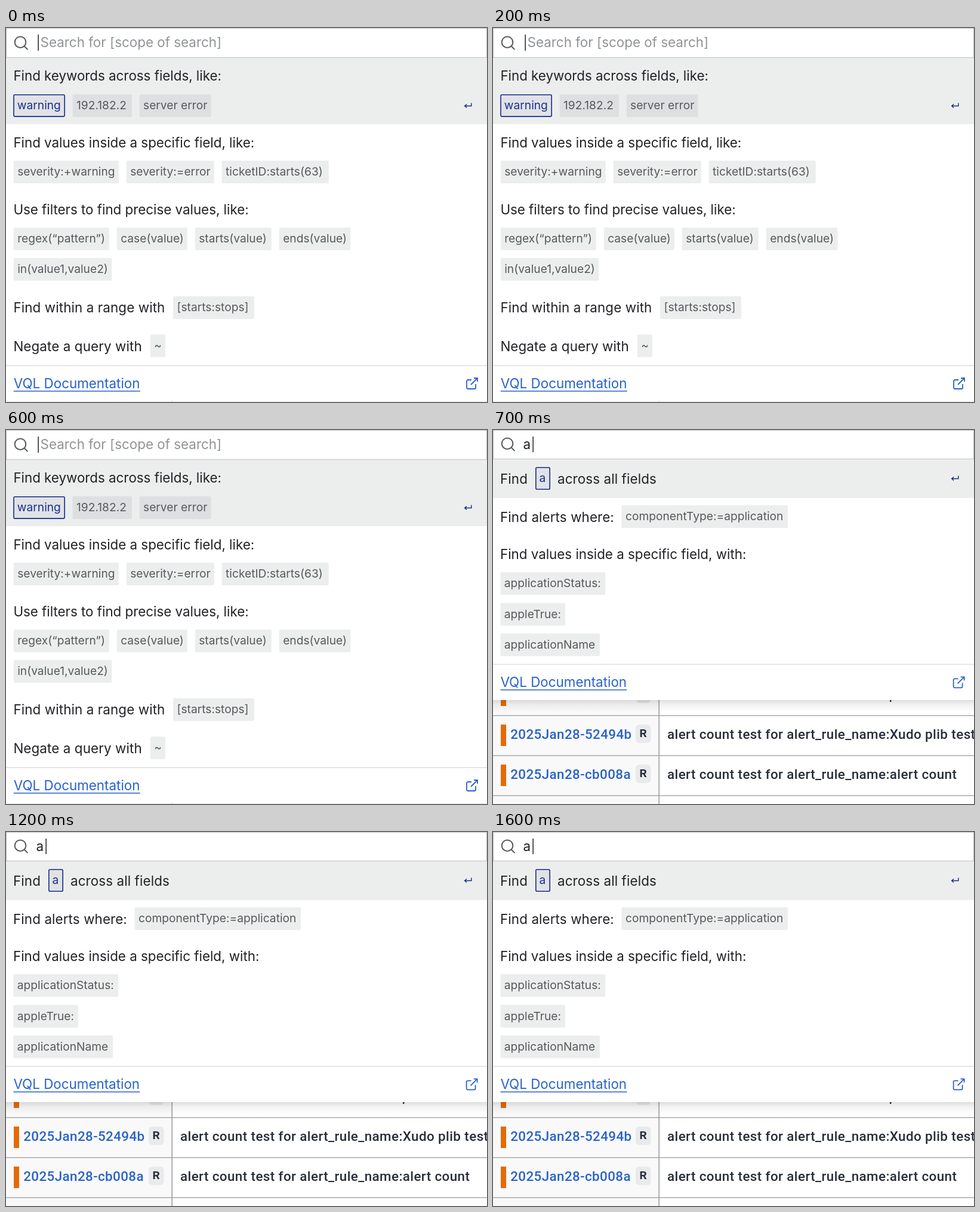
Recreate the animation shown at these times as an HTML page. Size 806x626 px, loop 4200 ms.

```html
<!DOCTYPE html>
<html lang="en">
<head>
<meta charset="utf-8">
<title>Search suggestions</title>
<style>
  html, body { margin: 0; width: 100%; height: 100%; overflow: hidden; background: #fff; }
  svg { display: block; width: 806px; height: 626px; }
  text { white-space: pre; font-optical-sizing: none; }
  .ui { font: 400 22.4px Inter, sans-serif; fill: #202226; }
  .title { letter-spacing: -.03px; }
  .lead { letter-spacing: .1px; }
  .chip { font: 400 19.2px Inter, sans-serif; fill: #56595c; }
  .hint { fill: #909396; }
  .link { fill: #2962cc; }
  .navy { fill: #1b2f8c; }
  .cell { font: 500 22.4px Roboto, sans-serif; letter-spacing: .4px; fill: #272d3a; }
  .cell.link { fill: #2962c8; }
  .badge { font: 700 19.2px Roboto, sans-serif; fill: #272d3a; }
</style>
</head>
<body>
<svg id="stage" viewBox="0 0 806 626"></svg>
<script>
const LOOP = 4200, TYPED_AT = 700;
const PALE = '#eceeee', GREY = '#dddfe1', NAVY = '#182a84', BLUE = '#2962cc';

const rect = (x, y, w, h, fill, extra = '') =>
  `<rect x="${x}" y="${y}" width="${w}" height="${h}" fill="${fill}" ${extra}/>`;
const text = (x, y, s, cls = 'ui') => `<text x="${x}" y="${y}" class="${cls}">${s}</text>`;
const title = (x, y, s) => text(x, y, s, 'ui title');
const lead = (x, y, s) => text(x, y, s, 'ui lead');
const stroke = (d, color, width, extra = '') =>
  `<path d="${d}" fill="none" stroke="${color}" stroke-width="${width}" ${extra}/>`;

const chip = (x, y, w, s, fill = PALE) =>
  rect(x, y, w, 38, fill, 'rx="2"') + text(x + 6.4, y + 25.4, s, 'chip');

const activeChip = (x, y, w, s) =>
  rect(x + .8, y + .8, w - 1.6, 36.4, '#e0e2e6', `rx="2" stroke="${NAVY}" stroke-width="1.6"`) +
  text(x + 6.6, y + 25.4, s, 'chip navy');

const enterKey = y =>
  stroke(`M779.8 ${y - 4.5}v5h-11M772 ${y - 2.6}l-3.4 3.1 3.4 3.1`, NAVY, 1.4);

const searchBox = bottom =>
  rect(0, 0, 806, bottom, '#fff') +
  stroke(`M.5 .5H805.5V${bottom - .5}H.5Z`, '#bfc1c2', 1.2) +
  `<circle cx="24" cy="${bottom - 26.3}" r="9.3" fill="none" stroke="#55585b" stroke-width="2"/>` +
  stroke(`M30.8 ${bottom - 19.5}l5.6 5.6`, '#55585b', 2);

const footer = (x, y, h) =>
  rect(0, y, 806, h, '#fff') + rect(0, y - .8, 806, 1.6, '#dfe1e2') +
  text(x, y + 38, 'VQL Documentation', 'ui link') +
  rect(x, y + 42, 212, 1.5, BLUE) +
  stroke('M18 13v6a2 2 0 0 1-2 2H5a2 2 0 0 1-2-2V8a2 2 0 0 1 2-2h6M15 3h6v6M10 14L21 3', BLUE, 1.8,
    `transform="translate(${x + 756.2} ${y + 18})"`);

function emptyQuery() {
  return rect(0, 0, 806, 626, '#fff') +
    rect(0, 49, 806, 112, PALE) +
    searchBox(50) +
    rect(53.4, 11, 1.5, 27, '#202226') +
    text(57.6, 32.3, 'Search for [scope of search]', 'ui hint') +
    title(12.4, 88.3, 'Find keywords across fields, like:') +
    activeChip(12.2, 110.9, 86.8, 'warning') +
    chip(111.6, 111, 99.4, '192.182.2', GREY) +
    chip(223.6, 111, 120, 'server error', GREY) +
    enterKey(130) +
    title(12.4, 199.5, 'Find values inside a specific field, like:') +
    chip(12.8, 222, 176, 'severity:+warning') +
    chip(201.8, 222, 147, 'severity:=error') +
    chip(361.6, 222, 179.2, 'ticketID:starts(63)') +
    title(12.4, 311.5, 'Use filters to find precise values, like:') +
    chip(12.8, 334, 160, 'regex(“pattern”)') +
    chip(185.8, 334, 118, 'case(value)') +
    chip(316.8, 334, 128, 'starts(value)') +
    chip(457.8, 334, 119.6, 'ends(value)') +
    chip(12.8, 385, 164.6, 'in(value1,value2)') +
    lead(12.4, 476.3, 'Find within a range with') +
    chip(280, 449, 136, '[starts:stops]') +
    lead(12.4, 540.5, 'Negate a query with') +
    chip(241.8, 513, 25.2, '~') +
    footer(12.8, 565, 61) +
    rect(0, 625, 806, 1, '#e4e5e6') + rect(278, 625, 1.5, 1, '#a0a2a4');
}

const tableRow = (y, id, summary) =>
  rect(13, y + 15, 9, 36, '#e56a05') +
  text(29.2, y + 39, id, 'cell link') +
  rect(239, y + 15, 25.5, 31, '#e9eaeb', 'rx="6"') +
  text(245.4, y + 36.3, 'R', 'badge') +
  text(292, y + 39, summary, 'cell');

function table() {
  const rule = y => rect(0, y - .8, 806, 1.6, '#aeb0b2');
  return rect(0, 452, 278, 174, '#f9f9f9') +
    rect(13, 440, 9, 22, '#e56a05') +
    rect(240, 426, 24, 31, '#e6e7e8', 'rx="6"') +
    rect(665, 450, 2.4, 5, '#272d3a') +
    [478, 545, 612].map(rule).join('') +
    rect(277.4, 452, 1.6, 174, '#9c9ea0') +
    tableRow(478, '2025Jan28-52494b', 'alert count test for alert_rule_name:Xudo plib test') +
    tableRow(545, '2025Jan28-cb008a', 'alert count test for alert_rule_name:alert count');
}

function typedQuery() {
  return rect(0, 0, 806, 626, '#fff') + table() +
    rect(0, 452, 806, 20, 'url(#shade)') +
    rect(0, 0, 806, 452, '#fff') +
    rect(0, 48, 806, 66, PALE) +
    searchBox(49) +
    text(50.4, 32, 'a') + rect(66.4, 11, 1.5, 26, '#202226') +
    lead(12, 89.5, 'Find') +
    activeChip(71, 62, 25, 'a') +
    lead(108, 89.5, 'across all fields') +
    enterKey(81) +
    lead(12, 153.5, 'Find alerts where:') +
    chip(215.6, 126, 278.4, 'componentType:=application') +
    title(12, 215.8, 'Find values inside a specific field, with:') +
    chip(12.4, 238, 175.8, 'applicationStatus:') +
    chip(12.4, 289.4, 108.6, 'appleTrue:') +
    chip(12.4, 340.6, 166.6, 'applicationName') +
    footer(12.4, 392.3, 59.7);
}

const stage = document.getElementById('stage');
stage.innerHTML = `
  <defs><linearGradient id="shade" x1="0" y1="0" x2="0" y2="1">
    <stop offset="0" stop-color="#000" stop-opacity=".13"/>
    <stop offset=".4" stop-color="#000" stop-opacity=".05"/>
    <stop offset="1" stop-color="#000" stop-opacity="0"/>
  </linearGradient></defs>
  <g id="empty">${emptyQuery()}</g>
  <g id="typed">${typedQuery()}</g>`;
const empty = document.getElementById('empty');
const typed = document.getElementById('typed');

const start = performance.now();
function draw(now) {
  const t = Math.max(0, now - start) % LOOP;
  empty.style.display = t < TYPED_AT ? '' : 'none';
  typed.style.display = t < TYPED_AT ? 'none' : '';
  requestAnimationFrame(draw);
}
draw(start);
</script>
</body>
</html>
```
